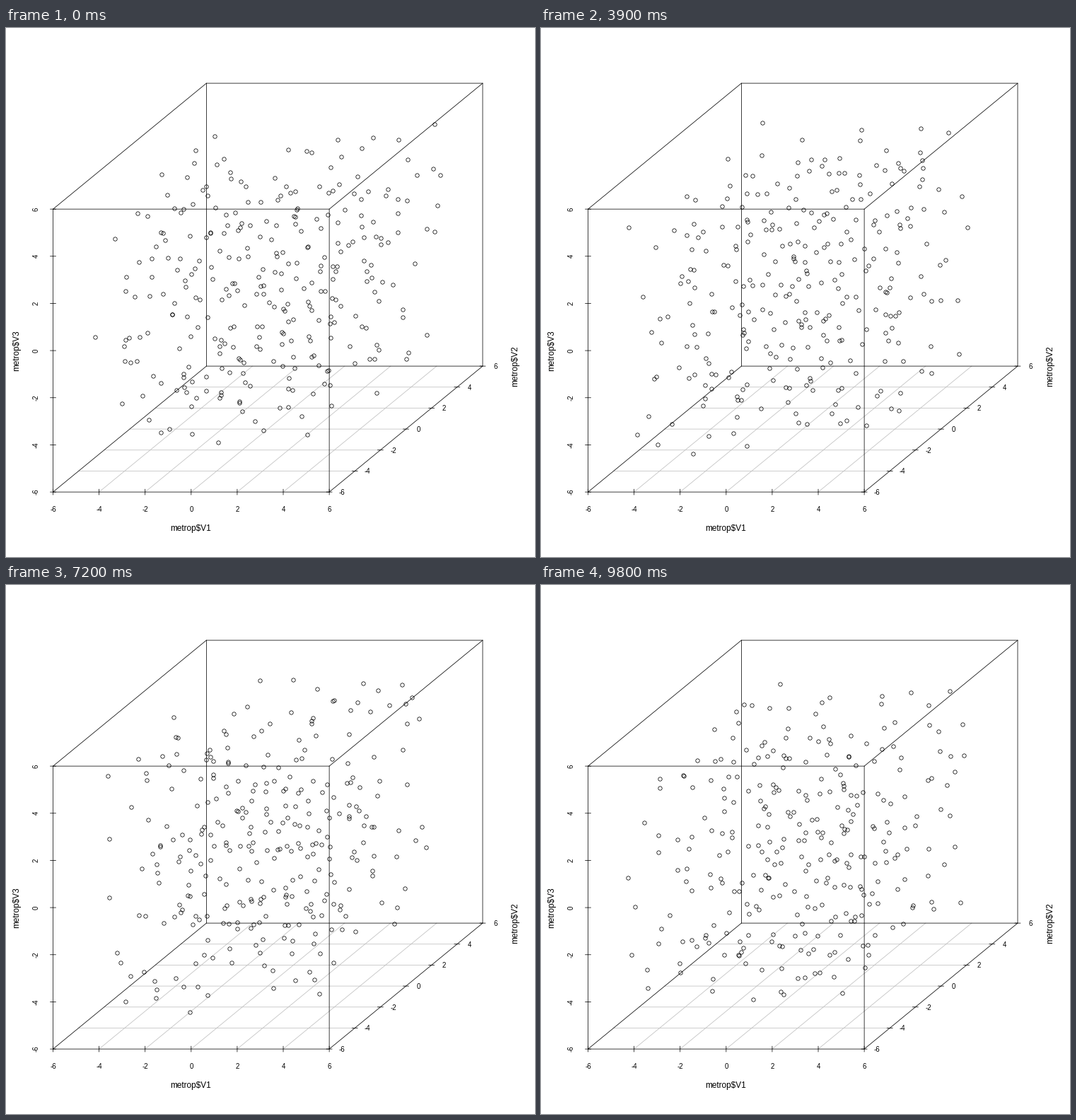
A matplotlib script for the animation above (9900 ms loop, 748 px wide and 748 px high).

```python
import numpy as np
import matplotlib.pyplot as plt
from matplotlib.animation import FuncAnimation

SIZE = 748
DPI = 64
PX = 72 / DPI          # one pixel in points
FRAMES = 99
STEP_MS = 100
COUNT = 300
LIMIT = 5              # the particles fill a cube from -5 to 5
GAP = 0.9              # smallest distance between two particles
TICKS = range(-6, 7, 2)
FONT = "Liberation Sans"


def project(v1, v2, v3):
    """Oblique projection of the -6..6 cube onto stage pixels."""
    x = 66.5 + (v1 + 6) * 390.6 / 12 + (v2 + 6) * 216.9 / 12
    y = 656.1 - (v3 + 6) * 400 / 12 - (v2 + 6) * 178 / 12
    return x, y


fig = plt.figure(figsize=(SIZE / DPI, SIZE / DPI), dpi=DPI, facecolor="white")
ax = fig.add_axes([0, 0, 1, 1])
ax.set_xlim(0, SIZE)
ax.set_ylim(SIZE, 0)
ax.axis("off")


def line(start, end, color="black", z=2):
    xs, ys = zip(start, end)
    ax.plot(xs, ys, color=color, lw=0.75 * PX, zorder=z, snap=False,
            solid_capstyle="round")


def edge(a, b, **style):
    line(project(*a), project(*b), **style)


def label(x, y, text, size=9.6, angle=0):
    ax.text(x, y, text, family=FONT, fontsize=size * PX, rotation=angle,
            ha="center", va="center_baseline" if angle == 0 else "center")


# Floor grid
for t in TICKS[1:-1]:
    edge((t, -6, -6), (t, 6, -6), color="#bebebe", z=1)
    edge((-6, t, -6), (6, t, -6), color="#bebebe", z=1)

# Cube edges
for a in (-6, 6):
    for b in (-6, 6):
        edge((-6, a, b), (6, a, b))
        edge((a, -6, b), (a, 6, b))
        edge((a, b, -6), (a, b, 6))

# Ticks and numbers
for t in TICKS:
    x, y = project(t, -6, -6)
    line((x, y - 4), (x, y + 4))
    label(x + 0.5, 680.5, str(t))

    x, y = project(-6, -6, t)
    line((x - 4, y), (x + 4, y))
    label(42.5, y, str(t), angle=90)

    x, y = project(6, t, -6)
    line((x - 4, y), (x + 4, y))
    label(x + 18, y, str(t))

label(261.5, 706.5, "metrop$V1", 11.7)
label(15, 456.5, "metrop$V3", 11.7, 90)
label(720, 478.5, "metrop$V2", 11.7, 90)

points, = ax.plot([], [], "o", ms=5.4 * PX, mfc="none", mec="black",
                  mew=0.75 * PX, zorder=3)


def particles(seed):
    """Random particles in the cube that keep their distance."""
    rng = np.random.default_rng(seed)
    placed = np.empty((COUNT, 3))
    n = 0
    while n < COUNT:
        spot = rng.uniform(-LIMIT, LIMIT, 3)
        if np.all(((placed[:n] - spot) ** 2).sum(axis=1) > GAP ** 2):
            placed[n] = spot
            n += 1
    return placed.T


def draw(frame):
    points.set_data(*project(*particles(700 + frame)))
    return points,


anim = FuncAnimation(fig, draw, frames=FRAMES, interval=STEP_MS,
                     repeat=True, repeat_delay=0)
plt.show()
```
